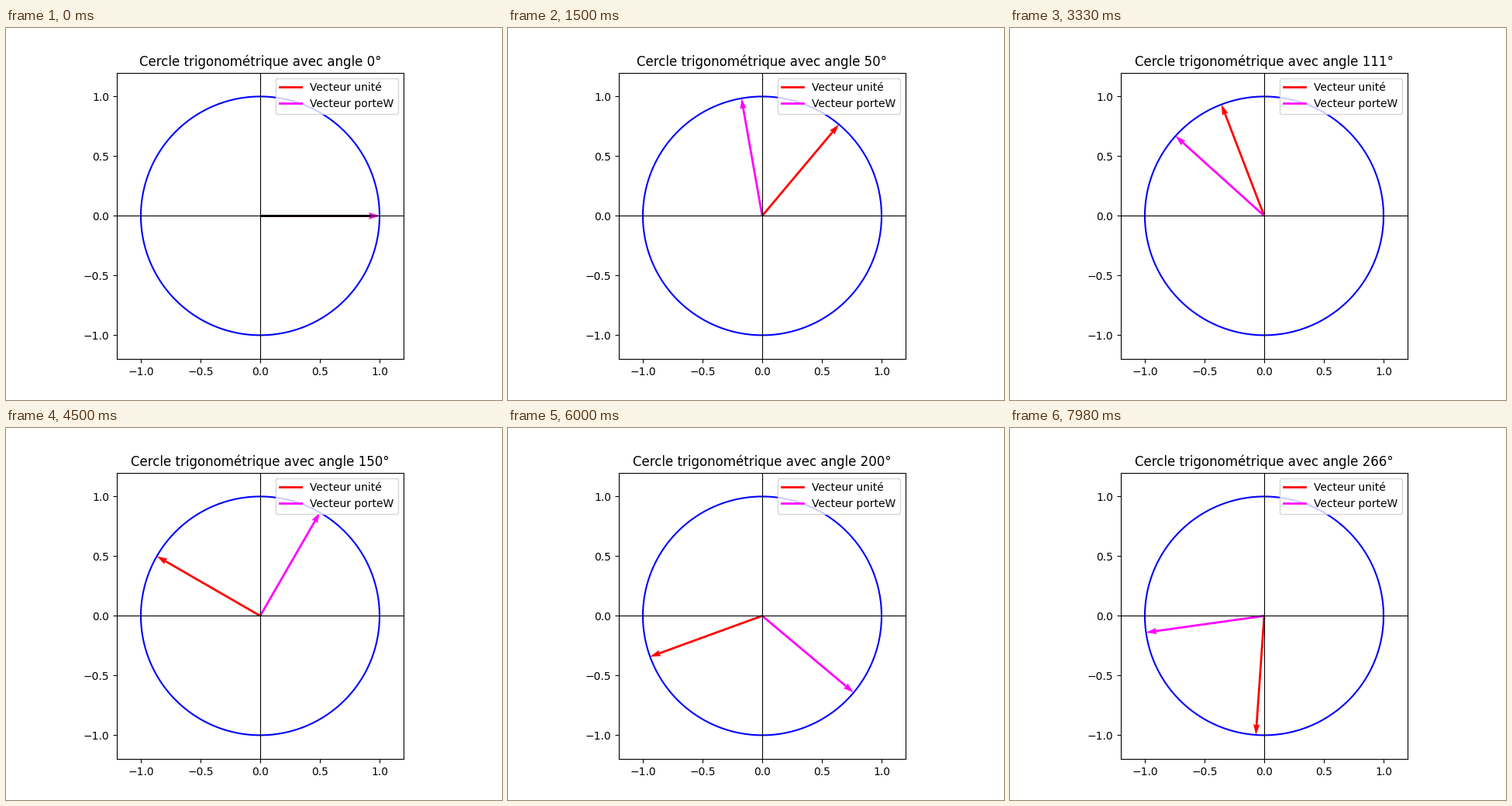
Write a matplotlib script that moves like this. It is 640 by 480 pixels and loops after 8 s.

```python
import numpy as np
import matplotlib.pyplot as plt
from matplotlib.animation import FuncAnimation

LOOP_MS = 8000
FRAMES = 267  # one degree per frame

fig, ax = plt.subplots(figsize=(6.4, 4.8), dpi=100)
ax.set_aspect("equal")
ax.set_xlim(-1.2, 1.2)
ax.set_ylim(-1.2, 1.2)

turn = np.linspace(0, 2 * np.pi, 361)
ax.plot(np.cos(turn), np.sin(turn), color="blue")
ax.axhline(0, color="black", lw=0.8)
ax.axvline(0, color="black", lw=0.8)


def arrow(color):
    return ax.quiver(0, 0, 1, 0, color=color, angles="xy",
                     scale_units="xy", scale=1)


def point(vector, degrees):
    a = np.radians(degrees)
    vector.set_UVC(np.cos(a), np.sin(a))


unit = arrow("red")
carrier = arrow("magenta")
start, = ax.plot([0, 0.92], [0, 0], color="black", lw=2,
                 solid_capstyle="butt")

keys = [ax.plot([], [], color=c, lw=2, label=name)[0]
        for c, name in (("red", "Vecteur unité"),
                        ("magenta", "Vecteur porteW"))]
ax.legend(handles=keys, loc="upper right")
title = ax.set_title("")


def update(angle):
    point(unit, angle)
    # The carrier runs at double speed and turns back at 180 degrees.
    point(carrier, 2 * angle if angle <= 90 else -2 * angle)
    start.set_visible(angle == 0)
    title.set_text(f"Cercle trigonométrique avec angle {angle}°")
    return unit, carrier, start, title


def init():
    return update(0)


anim = FuncAnimation(fig, update, frames=FRAMES, init_func=init,
                     interval=LOOP_MS / FRAMES, repeat=True, repeat_delay=0,
                     blit=False)
plt.show()
```
